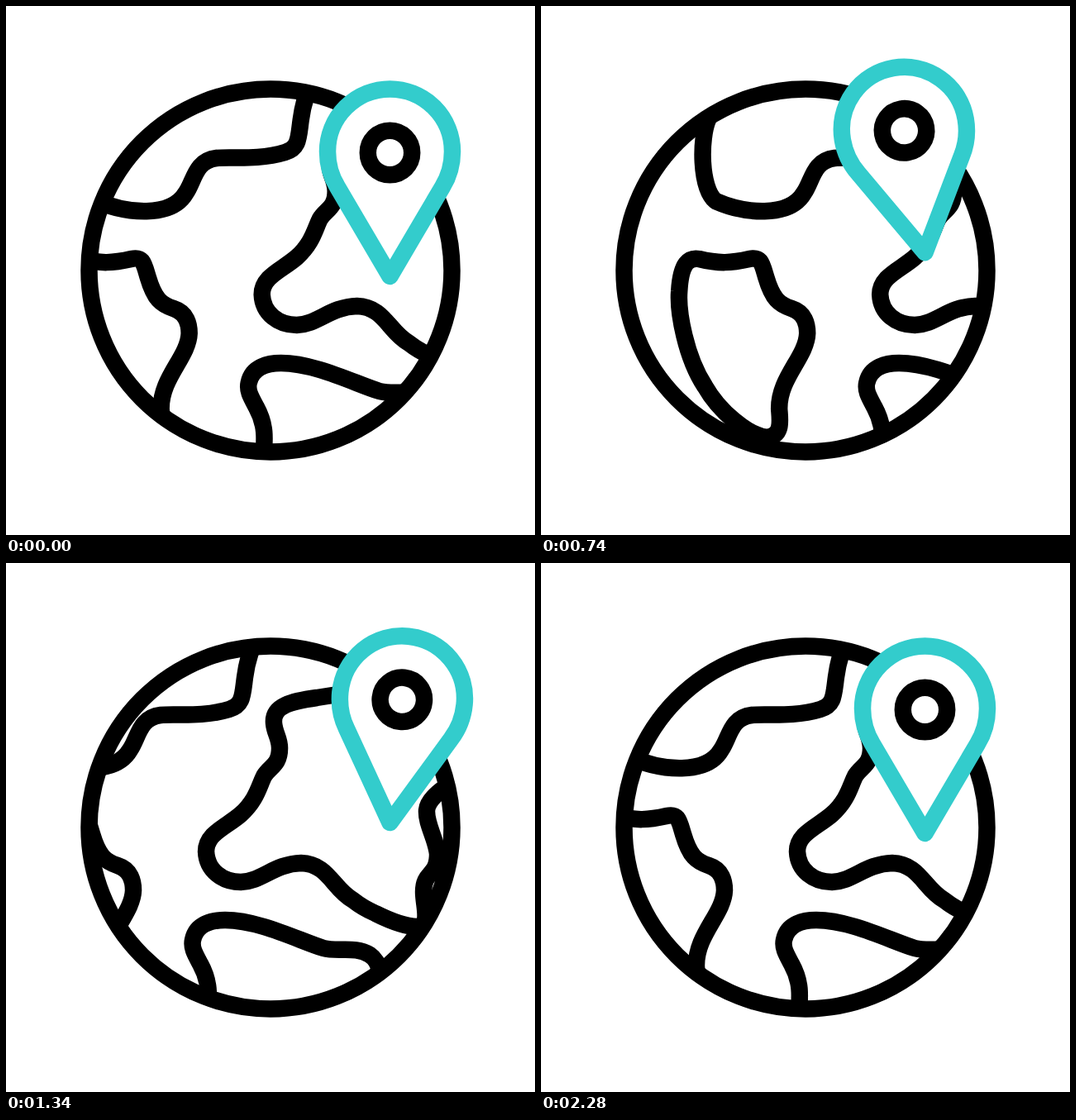
These frames come from a looping animation (640x640 px, 2400 ms). An HTML page:

```html
<!DOCTYPE html>
<html lang="en">
<head>
<meta charset="utf-8">
<title>Spinning globe with pin</title>
<style>
  html, body { margin: 0; height: 100%; overflow: hidden; background: #fff; }
  svg { display: block; width: 100%; height: 100%; }
</style>
</head>
<body>
<svg viewBox="0 0 640 640" fill="none" stroke="#000" stroke-width="20.5" stroke-linejoin="round">
  <defs>
    <clipPath id="disc"><circle cx="320" cy="320" r="229"/></clipPath>
    <g id="land">
      <path d="M385 70C368 90 360 115 357 138C354 160 355 172 338 177C305 187 272 182 255 184C229 187 228 212 218 226C200 257 145 251 111 236C92 220 92 160 102 137L118 100"/>
      <path d="M91 306C115 312 130 311 152 306C166 303 167 311 172 328C180 355 188 361 203 366C219 371 222 385 222 396C221 425 187 450 188 488C189 502 192 519 174 522C150 520 115 490 98 460C75 425 65 370 67 345C69 310 79 304 91 306Z"/>
      <path d="M444 163C415 167 390 172 392 194C393 206 399 212 399 224C399 245 387 246 380 258C374 270 371 287 352 304C335 319 310 327 310 349C311 372 330 386 352 386C378 385 392 364 425 363C458 364 463 394 488 408C498 416 506 420 515 424C535 434 553 440 566 440C582 438 573 415 573 398C573 372 590 380 590 352C588 333 576 316 577 299C579 279 612 266 625 250C644 228 624 160 570 157C530 150 480 157 444 163Z"/>
      <path d="M310 560C315 520 314 505 303 485C296 472 292 465 294 456C298 436 318 432 333 432C375 432 425 458 452 466C470 471 490 463 508 474C520 482 524 495 526 560"/>
    </g>
  </defs>
  <g clip-path="url(#disc)">
    <g id="map">
      <use href="#land"/>
      <use href="#land" x="-1280"/>
    </g>
  </g>
  <circle cx="320" cy="320" r="219.5"/>
  <g id="pin">
    <path fill="#fff" stroke="#3cc" d="M464.5 327L401 219C393 206 389 192 389 176a75.5 75.5 0 0 1 151 0C540 192 536 206 528 219Z"/>
    <circle cx="464.5" cy="177.5" r="26.7"/>
  </g>
</svg>
<script>
  const LOOP = 2400, SPIN = 2040, TURN = 1280;
  const map = document.getElementById('map');
  const pin = document.getElementById('pin');

  // [time, value] keys, eased in and out
  const lift = [[520, 0], [1040, -74], [1450, 0]];
  const tilt = [[530, 0], [1060, -27.5], [1450, 13.5], [1680, -8], [1900, 4], [2100, -2.6], [2280, 0]];

  function tween(keys, t) {
    if (t <= keys[0][0]) return keys[0][1];
    for (let i = 1; i < keys.length; i++) {
      const [t0, a] = keys[i - 1], [t1, b] = keys[i];
      if (t < t1) {
        const u = (t - t0) / (t1 - t0);
        return a + (b - a) * u * u * (3 - 2 * u);
      }
    }
    return keys[keys.length - 1][1];
  }

  const cubic = (s, a, b) => 3 * s * (1 - s) ** 2 * a + 3 * s * s * (1 - s) * b + s ** 3;

  // One turn that pulls back first and overshoots at the end
  function spin(x) {
    if (x >= 1) return 1;
    let lo = 0, hi = 1;
    for (let i = 0; i < 30; i++) {
      const mid = (lo + hi) / 2;
      if (cubic(mid, 0.694, 0.27) < x) lo = mid; else hi = mid;
    }
    return cubic(lo, -0.343, 1.285);
  }

  function draw(now) {
    const t = now % LOOP;
    map.setAttribute('transform', `translate(${TURN * spin(t / SPIN)} 0)`);
    pin.setAttribute('transform', `translate(0 ${tween(lift, t)}) rotate(${tween(tilt, t)} 464.5 327)`);
  }

  const start = performance.now();
  function frame() {
    draw(performance.now() - start);
    requestAnimationFrame(frame);
  }
  frame();
</script>
</body>
</html>
```
